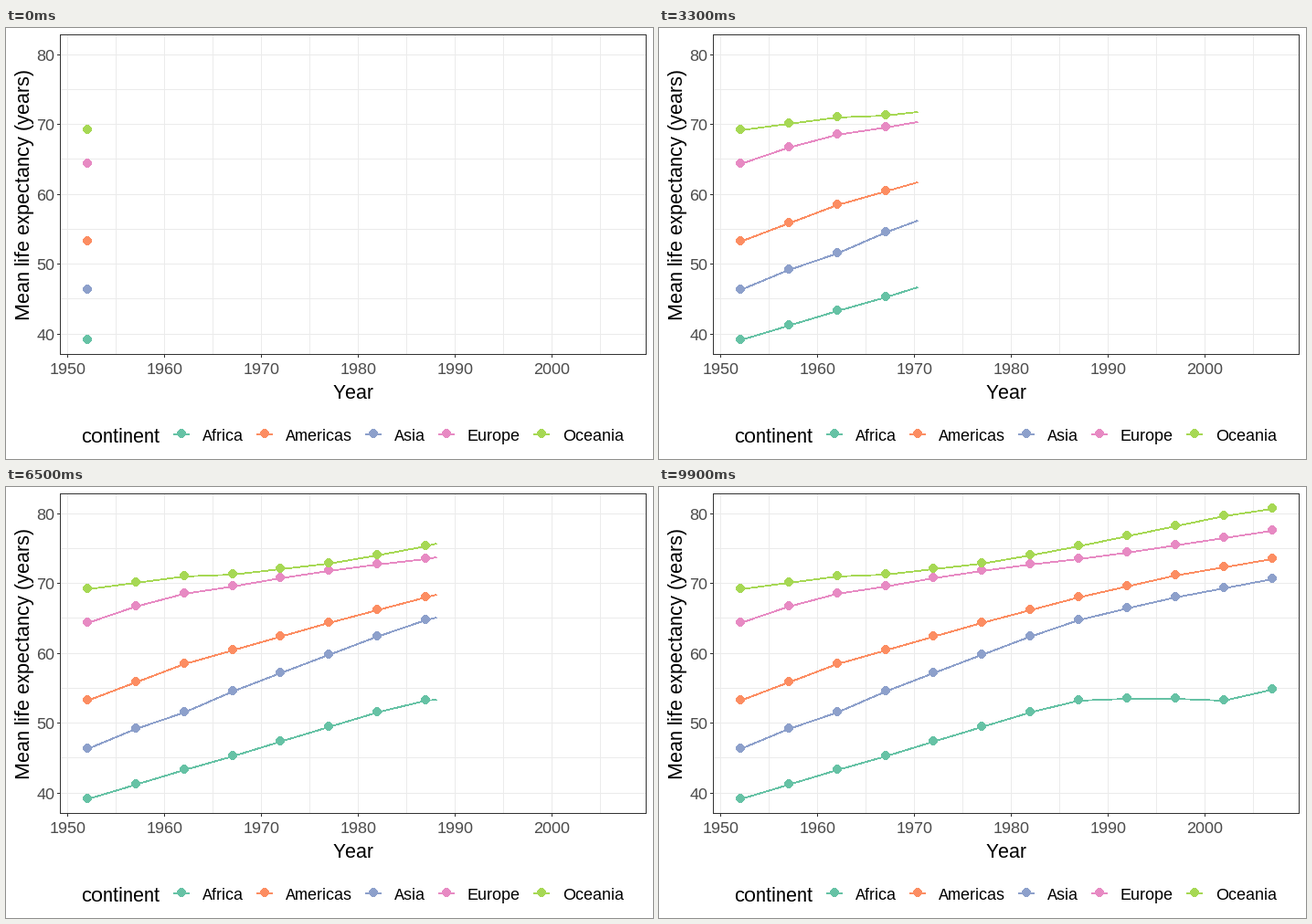
Recreate the animation shown at these times as a matplotlib script. Size 708 by 472 pixels, loop 10000 ms.

```python
import numpy as np
import matplotlib.pyplot as plt
from matplotlib.animation import FuncAnimation
from matplotlib.patches import Circle

W, H, DPI = 708, 472, 100
PT = 72 / DPI                      # points per pixel
FRAMES, STEP = 100, 9              # frames per loop, frames between surveys
LEFT, RIGHT, TOP, BOTTOM = 59, 700, 7, 357
DARK, GRID, LABEL = "#333333", "#EBEBEB", "#4D4D4D"

plt.rcParams.update({
    "font.family": ["Liberation Sans", "DejaVu Sans"],
    "text.hinting": "native",
    "text.hinting_factor": 1,
    "text.kerning_factor": 6,
})

# name: colour, legend x, bends of the trend as {survey: years of life}
SERIES = {
    "Africa": ("#66C2A5", 192, {0: 39.14, 6: 51.6, 7: 53.35, 8.5: 53.7, 10: 53.33, 11: 54.81}),
    "Americas": ("#FC8D62", 283, {0: 53.28, 2: 58.45, 5: 64.4, 7: 68.09, 9: 71.15, 11: 73.6}),
    "Asia": ("#8DA0CB", 402, {0: 46.31, 1: 49.27, 2: 51.65, 3: 54.55, 6: 62.45,
                              7: 64.85, 9: 68.05, 11: 70.72}),
    "Europe": ("#E78AC3", 482, {0: 64.41, 1: 66.7, 2: 68.54, 5: 71.9, 8: 74.44, 11: 77.64}),
    "Oceania": ("#A6D854", 586, {0: 69.25, 2: 71.1, 3: 71.3, 5: 72.83, 7: 75.38,
                                 10: 79.7, 11: 80.72}),
}
SURVEYS = np.arange(12)


def px(year, shift=0):
    return np.round(67.65 + shift + 10.583 * (year - 1950))


def py(value):
    return np.round(357.2 - 7.652 * (value - 37.0563))


def trend(bends, survey):
    return np.interp(survey, list(bends), list(bends.values()))


fig = plt.figure(figsize=(W / DPI, H / DPI), dpi=DPI, facecolor="white")
ax = fig.add_axes([0, 0, 1, 1])
ax.set_xlim(0, W)
ax.set_ylim(H, 0)
ax.axis("off")


def rule(x, y, w, h, color, z=1):
    ax.add_patch(plt.Rectangle((x, y), w, h, fc=color, lw=0, zorder=z))


def hline(y, x0, x1, color, z=1):
    rule(x0, y, x1 + 1 - x0, 1, color, z)


def vline(x, y0, y1, color, z=1):
    rule(x, y0, 1, y1 + 1 - y0, color, z)


# Unsmoothed shapes fill every pixel they touch, so they are drawn slightly thin.
def stroke(x, y, color):
    line, = ax.plot(x, y, color=color, lw=0.8 * PT, zorder=3, antialiased=False,
                    snap=False, solid_capstyle="butt")
    return line


def dot(x, y, color):
    return ax.add_patch(Circle((x, y), 4.2, fc=color, lw=0, antialiased=False, zorder=4))


def label(x, y, text, size, color="black", **kw):
    ax.text(x, y, text, fontsize=size * PT, color=color, va="baseline", **kw)


# Grid, ticks and tick labels
for year in range(1950, 2006, 5):
    x = px(year, -0.17)
    vline(x, TOP, BOTTOM, GRID)
    if year % 10 == 0:
        vline(x, BOTTOM, BOTTOM + 3, DARK, 5)
        label(x + 0.5, 379, str(year), 18, LABEL, ha="center")
for value in range(40, 81, 5):
    y = py(value)
    hline(y, LEFT, RIGHT, GRID)
    if value % 10 == 0:
        hline(y, LEFT - 3, LEFT, DARK, 5)
        label(53.5, y + 7, str(value), 18, LABEL, ha="right")

# Panel border
for y in (TOP, BOTTOM):
    hline(y, LEFT, RIGHT, DARK, 5)
for x in (LEFT, RIGHT):
    vline(x, TOP, BOTTOM, DARK, 5)

label(380, 406, "Year", 22, ha="center")
label(26, 182, "Mean life expectancy (years)", 22, ha="center",
      rotation=90, rotation_mode="anchor")

# Legend and animated series
label(82, 454, "continent", 22)
tracks = []
for name, (color, key, bends) in SERIES.items():
    stroke([key - 9, key + 9], [445, 445], color)
    dot(key, 444, color)
    label(key + 23, 452, name, 18)
    line = stroke([], [], color)
    dots = [dot(px(1952 + 5 * s), py(trend(bends, s)), color) for s in SURVEYS]
    tracks.append((bends, line, dots))


def update(i):
    now = i / STEP
    path = np.append(SURVEYS[SURVEYS <= now], now)
    for bends, line, dots in tracks:
        line.set_data(px(1952 + 5 * path), py(trend(bends, path)) + 1)
        for s, mark in zip(SURVEYS, dots):
            mark.set_visible(s <= now)


anim = FuncAnimation(fig, update, frames=FRAMES, interval=100, repeat=True,
                     repeat_delay=0, blit=False)
plt.show()
```
